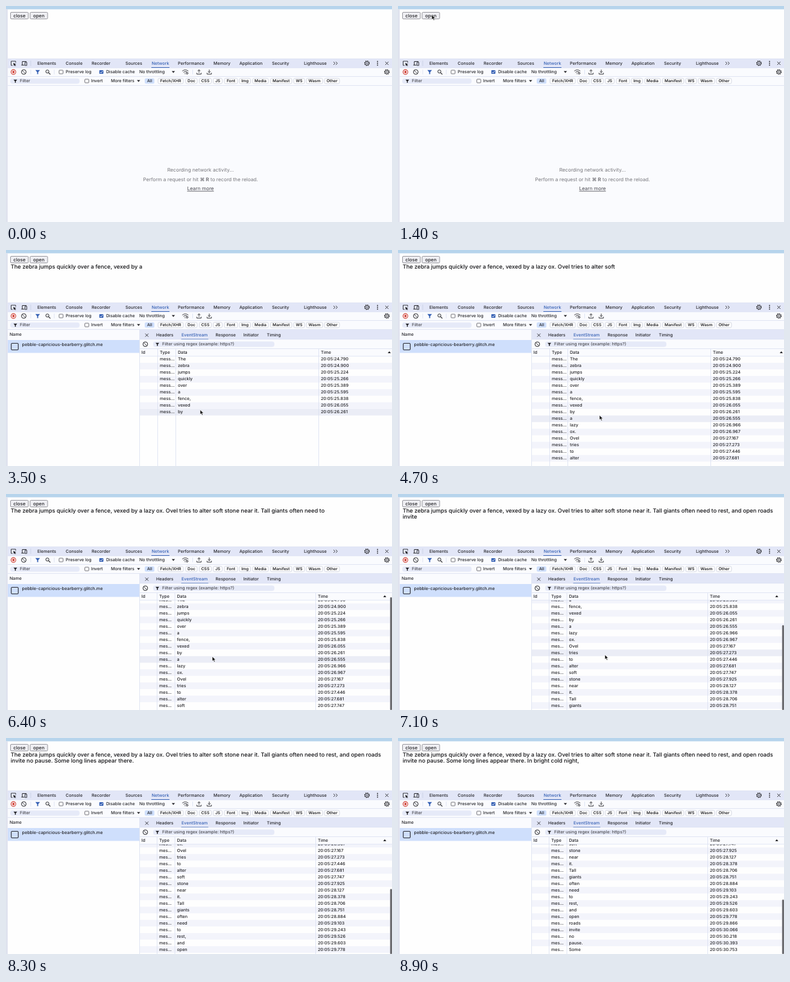
These frames come from a looping animation (640 by 360 pixels, 9 s). An HTML page:

```html
<!DOCTYPE html>
<html lang="en">
<head>
<meta charset="utf-8">
<title>Event stream in the network panel</title>
<style>
  html, body { margin: 0; width: 100%; height: 100%; overflow: hidden; background: #fefefe; }
  svg { display: block; }
  text { font-family: Inter, "Liberation Sans", sans-serif; text-rendering: geometricPrecision; white-space: pre; }
</style>
</head>
<body>
<svg id="stage" width="640" height="360" viewBox="0 0 640 360"><g id="fixed"></g><g id="live"></g></svg>
<script>
const LOOP = 9000, ROW = 10.97, CLOCK = 23070;
const OPENED = 1455, ANSWERED = 1615, SELECTED = 2620;
const INK = '#222226', GREY = '#909096', PAGE = '#fefefe', BAR = '#e2e6f7', PALE = '#fafbfe',
      FIELD = '#e6eaf8', STRIPE = '#f3f4fb', HOVER = '#ebedf6', SELECTION = '#cfdffc',
      BLUE = '#3560b4', LINE = '#d9dff0';

const words = ('The zebra jumps quickly over a fence, vexed by a lazy ox. Ovel tries to alter soft ' +
  'stone near it. Tall giants often need to rest, and open roads invite no pause. ' +
  'Some long lines appear there. In bright cold night,').split(' ');
const FIRST_LINE = words.indexOf('invite');
// Arrival of each word in ms after 20:05:00.
const arrivals = [24790, 24900, 25224, 25266, 25389, 25595, 25838, 26055, 26261, 26555, 26966,
  26967, 27167, 27273, 27446, 27681, 27747, 27925, 28127, 28378, 28706, 28751, 28884, 29103,
  29243, 29526, 29603, 29778, 29866, 30066, 30218, 30393, 30753, 30900, 31050, 31200, 31340,
  31450, 31600, 31750, 31920];
// Table rows once the list overflows: [time, rows].
const backlog = [[6400, 17], [7080, 22], [8260, 28], [8860, 33], [9000, 34]];
// Pointer: [time, x, y].
const path = [[0, 300, 372], [300, 300, 372], [1100, 56, 15], [1450, 56, 15], [2150, 89.5, 163],
  [2700, 89.5, 163], [3600, 330, 270], [4700, 334, 275.5], [6400, 342, 271], [7100, 343, 268],
  [7400, 343, 268], [8000, 420, 372], [9000, 420, 372]];

const smooth = u => u * u * (3 - 2 * u);
function along(keys, t, k, ease = u => u) {
  const i = Math.max(1, keys.findIndex(p => p[0] >= t));
  const a = keys[i - 1], b = keys[i];
  return a[k] + (b[k] - a[k]) * ease((t - a[0]) / (b[0] - a[0]));
}

const rect = (x, y, w, h, fill, more = '') =>
  `<rect x="${x}" y="${y}" width="${w}" height="${h}" fill="${fill}" ${more}/>`;
// y is the middle of the capitals.
const text = (x, y, s, { size = 7.1, fill = INK, weight = 500, anchor = 'start', more = '' } = {}) =>
  `<text x="${x}" y="${y + size * .35}" font-size="${size}" font-weight="${weight}" fill="${fill}" text-anchor="${anchor}" ${more}>${s}</text>`;
const stroke = (d, color = INK, w = .9) =>
  `<path d="${d}" fill="none" stroke="${color}" stroke-width="${w}"/>`;
const fill = (d, color = INK) => `<path d="${d}" fill="${color}"/>`;
const ring = (x, y, r, color = INK, w = 1) =>
  `<circle cx="${x}" cy="${y}" r="${r}" fill="none" stroke="${color}" stroke-width="${w}"/>`;
const vline = (x, y1, y2, color = LINE) => stroke(`M${x} ${y1}V${y2}`, color, .8);
const hline = (y, x1 = 3, x2 = 640) => stroke(`M${x1} ${y}H${x2}`, LINE, .8);

const down = (x, y) => fill(`M${x - 2.7} ${y - 1.4}h5.4l-2.7 3z`);
const up = (x, y) => fill(`M${x - 2.5} ${y + 1.5}h5l-2.5 -3.2z`);
const cross = (x, y) => stroke(`M${x - 2.6} ${y - 2.6}l5.2 5.2m0 -5.2l-5.2 5.2`);
const clear = (x, y) => ring(x, y, 3.9) + stroke(`M${x - 2.7} ${y - 2.7}l5.4 5.4`);
const funnel = (x, y, s = 1, color = INK) =>
  fill(`M${x - 3.8 * s} ${y - 3.2 * s}h${7.6 * s}l${-2.9 * s} ${3.5 * s}v${3.2 * s}h${-1.8 * s}v${-3.2 * s}z`, color);
const gear = (x, y) => ring(x, y, 3.1) + ring(x, y, 1, INK, .8) +
  `<circle cx="${x}" cy="${y}" r="4" fill="none" stroke="${INK}" stroke-width="1.1" stroke-dasharray="1.6 1.54"/>`;
const box = (x, y) => rect(x - 3.3, y - 3, 6.6, 6, PAGE, `rx="1" stroke="#606068" stroke-width=".9"`);
const button = (x, w, s) => rect(x, 10.5, w, 11, '#efeff3', 'rx="1.5" stroke="#7a7a82" stroke-width=".8"') +
  text(x + w / 2, 16, s, { size: 7.8, anchor: 'middle' });

function fixedScene() {
  const tabs = [[52, 'Elements'], [99, 'Console'], [142, 'Recorder'], [198, 'Sources'], [241.5, 'Network'],
    [285, 'Performance'], [344, 'Memory'], [387, 'Application'], [441, 'Security'], [494, 'Lighthouse']];
  const chips = [[252, 294, 'Fetch/XHR'], [298, 317, 'Doc'], [320.5, 340.5, 'CSS'], [343.5, 358.5, 'JS'],
    [362, 384, 'Font'], [387, 405.5, 'Img'], [409, 435, 'Media'], [438.5, 474, 'Manifest'],
    [477, 495, 'WS'], [498, 525, 'Wasm'], [528, 553, 'Other']];
  return rect(0, 0, 640, 360, PAGE) + rect(0, 0, 640, 5.5, '#b6d4ec') +
    button(7.5, 29.5, 'close') + button(40, 29, 'open') +
    rect(3, 88, 637, 15, BAR) + rect(3, 103, 637, 257, PALE) +
    hline(88) + hline(103) + hline(117.5) + hline(132.5) +
    // Tab bar
    stroke('M11 99h-2.5v-7h7.5v2.5', INK, .9) + fill('M12 95l5 2l-2.1 .8l1.6 1.6l-.8 .8l-1.6 -1.7l-.8 1.9z') +
    stroke('M34 92.5h-7v5.5M25.5 98.5h5', INK, 1) + rect(31.5, 94, 3, 5, BAR, `stroke="${INK}" stroke-width=".9"`) +
    vline(41, 91, 100, '#c6cde2') +
    tabs.map(([x, s]) => text(x, 95.5, s, s === 'Network' ? { fill: BLUE } : {})).join('') +
    rect(241, 102, 30, 1, BLUE) +
    stroke('M543 93l2.6 2.5l-2.6 2.5m3.8 -5l2.6 2.5l-2.6 2.5') + gear(598.5, 95.5) +
    [92.5, 95.5, 98.5].map(y => `<circle cx="616" cy="${y}" r=".9" fill="${INK}"/>`).join('') + cross(631.5, 95.5) +
    // Toolbar
    ring(12.3, 110, 3.9, '#d0382c', 1.1) + rect(10.6, 108.3, 3.4, 3.4, '#d0382c') + clear(29.5, 110) +
    vline(41, 106, 114) + funnel(52.5, 110, 1, BLUE) + ring(68.6, 109.2, 2.6) + stroke('M70.5 111.2l3 2.8', INK, 1.1) +
    vline(80, 106, 114) + box(91.3, 110) + text(99, 110, 'Preserve log') +
    rect(154.7, 107, 6.8, 6, BLUE, 'rx="1"') + stroke('M156 110l1.6 1.6l2.7 -3.1', '#fff', 1) +
    text(166, 110, 'Disable cache') + text(221, 110, 'No throttling') + down(277.5, 110) +
    stroke('M292.3 108.4q5 -3.8 10 0M294.3 110.5q3 -2.2 5.5 -.8M296 112.3l1.4 1.2') + ring(300.3, 112, 1.5) +
    vline(309.5, 106, 114) +
    stroke('M320 111.5v-5M317.8 108.4l2.2 -2.2l2.2 2.2M316.3 111.3v2.2h7.4v-2.2') +
    stroke('M337 106v5M334.8 109l2.2 2.2l2.2 -2.2M333.3 111.3v2.2h7.4v-2.2') + gear(631.5, 110) +
    // Filter bar
    rect(7, 120.7, 115, 8.8, FIELD, 'rx="4"') + funnel(15.5, 125.2, .8) + text(23, 125, 'Filter', { fill: '#48484e' }) +
    box(134, 125) + text(141, 125, 'Invert') + text(174, 125, 'More filters') + down(219.8, 125) +
    rect(230, 120.5, 16, 9, SELECTION, 'rx="2.5"') + text(238, 125, 'All', { anchor: 'middle', size: 6.8 }) +
    chips.map(([a, b, s]) => rect(a, 120.5, b - a, 9, PAGE, 'rx="2.5" stroke="#ccd0dc" stroke-width=".8"') +
      text((a + b) / 2, 125, s, { anchor: 'middle', size: 6.7, weight: 600 })).join('') +
    rect(0, 5.5, 2.8, 354.5, '#dfe2ee');
}

function waiting() {
  const o = { size: 8.2, fill: '#77777c', weight: 400, anchor: 'middle' };
  return text(322.5, 273.5, 'Recording network activity...', o) +
    text(322.5, 289, 'Perform a request or hit <tspan font-weight="700">⌘ R</tspan> to record the reload.', o) +
    text(322.5, 304.5, 'Learn more', { ...o, fill: '#46464e', more: 'text-decoration="underline"' });
}

const requestName = () => rect(8.7, 155.5, 11.6, 11, 'none', `rx="1.5" stroke="${INK}" stroke-width="1.1"`) +
  text(26.5, 157, 'pebble-capricious-bearberry.glitch.me', { size: 7.2 });

function requestList(t, n, hover) {
  const columns = [[6, 'Name'], [214, 'Method'], [272, 'Status'], [323, 'Protocol'], [380, 'Type'],
    [454, 'Initiator'], [532, 'Size'], [594, 'Time']];
  const answered = t >= ANSWERED;
  const body = Math.round(words.slice(0, n).join('').length + 9.5 * n);
  const total = n ? arrivals[n - 1] - CLOCK - OPENED : ANSWERED - OPENED;
  const sub = { fill: GREY }, end = { anchor: 'end' };
  const s = rect(3, 133, 637, 227, PAGE) + rect(3, 133, 637, 16.5, PALE) +
    rect(3, 150, 637, 21.5, hover ? HOVER : PAGE) + hline(149.8) +
    columns.map(([x, c]) => text(x, 141, c)).join('') +
    [211.5, 269.5, 320.5, 377, 451, 530, 591].map(x => vline(x, 133, 360)).join('') +
    requestName() + text(214.5, 161, 'GET') + text(454, 161, 'Other', sub);
  if (!answered) return s + text(272, 161, '(pending)', sub) + text(617, 161, 'Pending', sub);
  return s + text(272, 156, '200') + text(272, 166, 'OK', sub) + text(323, 161, 'h2') +
    text(380, 161, 'eventsource') + text(588, 156, body + 109 + ' B', end) +
    text(588, 166, body + ' B', { ...sub, ...end }) +
    text(617, 156, total + ' ms') + text(616, 166, ANSWERED - OPENED + ' ms', sub);
}

function eventPanel(n, px, py) {
  const full = n > 16, dx = full ? 1 : 0;
  const typeX = 255 - dx, dataX = 285 - 1.5 * dx, timeX = 522 - 5 * dx;
  const scroll = full ? n * ROW - 181 : 0;
  const tabs = [[249, 'Headers'], [291, 'EventStream'], [347.5, 'Response'], [393.5, 'Initiator'], [432.5, 'Timing']];
  let rows = '';
  for (let i = 0; i < n; i++) {
    const y = i * ROW - scroll, mid = y + 5;
    if (y < -ROW) continue;
    const hover = px > 222 && py > 177 && py + 2 >= 177 + y && py + 2 < 177 + y + ROW;
    if (hover || i % 2) rows += rect(222, y, 418, ROW, hover ? HOVER : STRIPE);
    rows += text(typeX, mid, full ? 'mes...' : 'mess...') + text(dataX, mid, words[i]) +
      text(timeX, mid, '20:05:' + (arrivals[i] / 1000).toFixed(3));
  }
  const thumb = 188 * Math.min(1, 17 / n) ** 1.1;
  return rect(3, 133, 637, 227, PAGE) + rect(3, 133, 218, 16.5, PALE) + text(6, 141, 'Name') +
    rect(3, 150, 218, 21.5, SELECTION) + requestName() +
    rect(222, 133, 418, 16, BAR) + cross(233.5, 142) +
    tabs.map(([x, s]) => text(x, 142, s, s === 'EventStream' ? { fill: BLUE } : {})).join('') +
    rect(290.5, 148, 45, 1, BLUE) + hline(149, 222) +
    rect(222, 149.4, 418, 15, PALE) + clear(231, 157) +
    rect(244, 152.4, 201, 9, FIELD, 'rx="4"') + funnel(251, 157.2, .8) +
    text(259, 157, 'Filter using regex (example: https?)', { fill: '#48484e' }) +
    hline(164.5, 222) + rect(222, 165, 418, 12, PALE) +
    `<svg x="0" y="177" width="640" height="183">${rows}</svg>` + hline(177, 222) +
    text(224.5, 171, 'Id') + text(typeX, 171, 'Type') + text(dataX, 171, 'Data') + text(timeX, 171, 'Time') +
    up(full ? 628 : 635.5, 170.5) +
    [221.5, typeX - 3.5, dataX - 3.5, timeX - 3.5].map((x, i) => vline(x, i ? 165 : 133, 360)).join('') +
    (full ? rect(636.8, 360 - thumb, 3.2, thumb, '#6c6c70', 'rx="1.5"') : '');
}

const pointer = (x, y) => `<path transform="translate(${x} ${y})" d="M0 0v7.6l1.8 -1.6l1.3 2.9l1.4 -.6l-1.3 -2.8h2.5z"
  fill="#111" stroke="#fff" stroke-width=".6"/>`;

function liveScene(t) {
  const received = ms => arrivals.filter(a => a - CLOCK <= ms).length;
  const n = received(t);
  const rows = t < 6400 ? Math.min(17, received(t - 60)) : Math.floor(along(backlog, t, 1));
  const x = along(path, t, 1, smooth), y = along(path, t, 2, smooth);
  const prose = { size: 9.28, fill: '#111114' };
  const panel = t < OPENED ? waiting()
    : t < SELECTED ? requestList(t, n, y > 150 && y < 171.5)
    : eventPanel(rows, x, y);
  return panel +
    text(7.7, 27.5, words.slice(0, Math.min(n, FIRST_LINE)).join(' '), prose) +
    text(7.7, 38, words.slice(FIRST_LINE, Math.max(n, FIRST_LINE)).join(' '), prose) +
    pointer(x, y);
}

const live = document.getElementById('live');
document.getElementById('fixed').innerHTML = fixedScene();
const start = performance.now();
function draw() {
  live.innerHTML = liveScene((performance.now() - start) % LOOP);
  requestAnimationFrame(draw);
}
draw();
</script>
</body>
</html>
```
